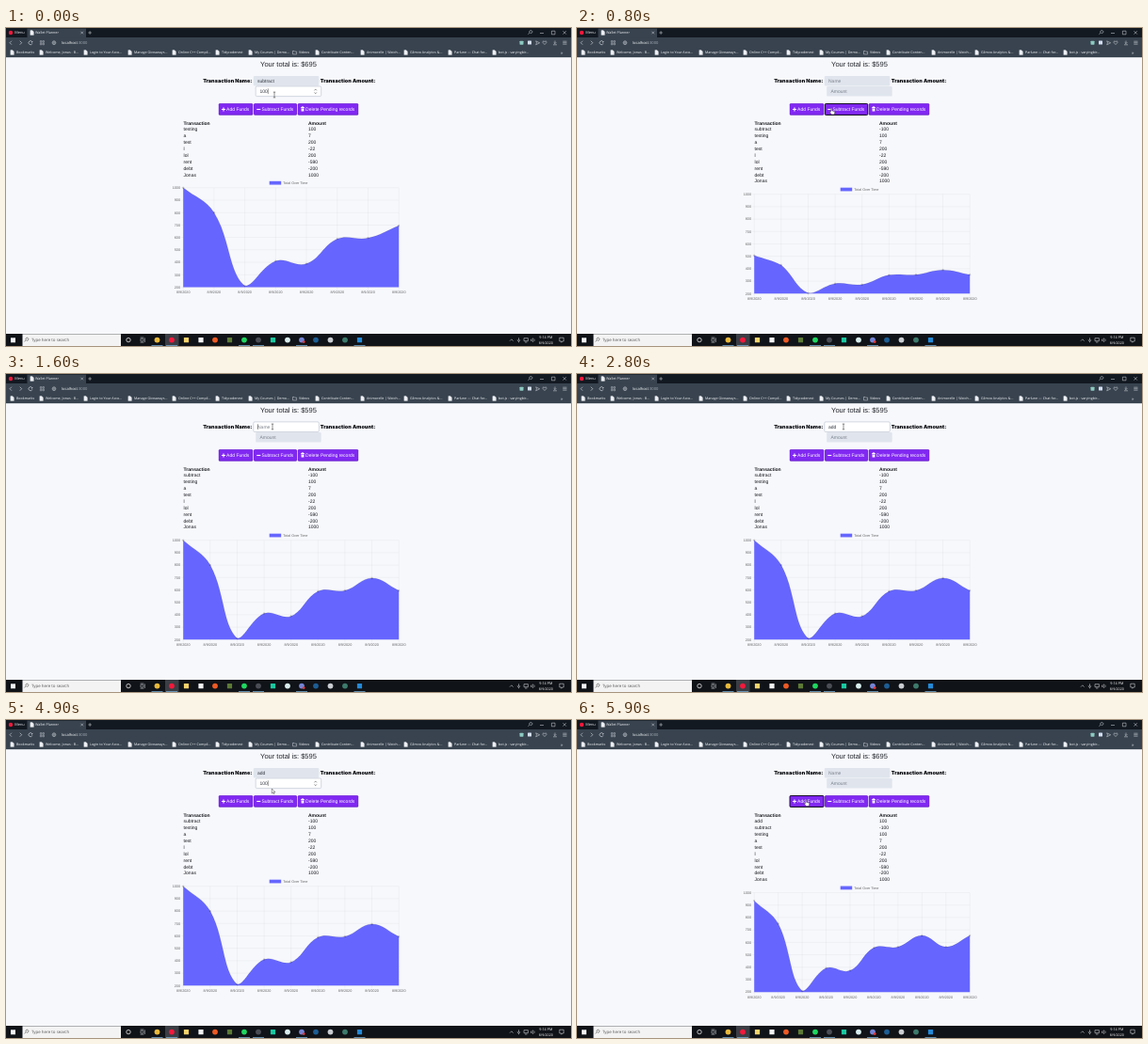
An HTML page that plays this animation: 600x338 px, repeating every 6000 ms.

```html
<!DOCTYPE html>
<html lang="en">
<head>
<meta charset="utf-8">
<title>Wallet Planner</title>
<style>
html, body { margin: 0; width: 100%; height: 100%; overflow: hidden; background: #f7f8fc; }
svg { display: block; width: 100vw; height: 100vh; font-family: "Liberation Sans", Arial, sans-serif; text-rendering: geometricPrecision; }
.ui { font-family: "Open Sans", "Noto Sans", sans-serif; }
.label { font-family: Inter, sans-serif; font-weight: 900; }
</style>
</head>
<body>
<svg viewBox="0 0 600 338"><g id="page"></g><g id="frame" class="ui"></g><g id="cursor"></g></svg>
<script>
const $ = id => document.getElementById(id);
const rect = (x, y, w, h, fill, more = '') =>
  `<rect x="${x}" y="${y}" width="${w}" height="${h}" fill="${fill}" ${more}/>`;
const disc = (x, y, r, fill, more = '') => `<circle cx="${x}" cy="${y}" r="${r}" fill="${fill}" ${more}/>`;
const text = (x, y, s, size, fill, more = '') =>
  `<text x="${x}" y="${y}" font-size="${size}" fill="${fill}" ${more}>${s}</text>`;
const line = (d, stroke, w = 0.6, fill = 'none') =>
  `<path d="${d}" stroke="${stroke}" stroke-width="${w}" fill="${fill}"/>`;
const END = 'text-anchor="end"', MID = 'text-anchor="middle"';

// Browser window and taskbar

const bookmarks = [
  [5, 'Bookmarks'], [36, 'Welcome, Jonas - B...'], [83, 'Login to Your Acco...'],
  [130, 'Manage Giveaways...'], [177, 'Online C++ Compil...'], [223, 'Tidycodenest'],
  [258, 'My Courses | Demo...'], [305, 'Videos'], [329, 'Contribute Conten...'],
  [377, 'Animorelle | Watch...'], [423, 'Glimvo Analytics &amp;...'],
  [470, 'Parlune — Chat for...'], [517, 'bot.js - varyingbir...']
];

const fileIcon = (x, y) =>
  line(`M${x - 1.7} ${y - 2.4}h2.2l1.4 1.4v3.4h-3.6z`, '#eef0f4', 0.3, '#eef0f4');
const folderIcon = (x, y) => line(`M${x - 2} ${y - 1.6}h1.5l.6.7h2v2.8h-4.1z`, '#d5d9e0', 0.5);
const lens = (x, y, color) => line(`M${x - 2} ${y + 2}l1.7-1.7a1.5 1.5 0 1 1 .5.4`, color, 0.55);

function browser() {
  const pale = '#dde1e7';
  let s = rect(0, 0, 600, 10.2, '#131921') + rect(0, 10, 600, 21.2, '#38434f')
    + rect(22.5, 0.6, 62.5, 9.8, '#38434f');
  s += disc(5, 5, 2.2, '#f5193c') + text(9.2, 6.4, 'Menu', 3.9, '#e8e9ee');
  s += fileIcon(27.5, 5) + text(31, 6.4, 'Wallet Planner', 3.7, '#f0f1f5');
  s += line('M79.4 3.7l2.6 2.6m0-2.6l-2.6 2.6M87.3 5h3.6m-1.8-1.8v3.6', pale, 0.5);
  s += lens(556.5, 4.7, pale);
  s += line('M567 5.5h4M579.4 3.2h3.6v3.6h-3.6zM591.5 3.2l3.4 3.4m0-3.4l-3.4 3.4', pale, 0.5);
  s += line('M6 13.7l-2 2 2 2M14.7 13.7l2 2-2 2M27.8 14.8a2 2 0 1 0 .1 1.6m.1-2.5v1.2h-1.2', pale);
  s += line('M36.3 13.6h1.6v1.6h-1.6zm2.6 0h1.6v1.6h-1.6zm-2.6 2.6h1.6v1.6h-1.6zm2.6 0h1.6v1.6h-1.6z', pale, 0.4);
  s += disc(51, 15.7, 1.9, 'none', `stroke="${pale}" stroke-width=".45"`)
    + line('M49.1 15.7h3.8M51 13.8q-1.6 1.9 0 3.8q1.6-1.9 0-3.8', pale, 0.3);
  s += text(59, 17.1, 'localhost<tspan fill="#a9b1bb">:3000</tspan>', 4.05, '#fff');
  s += rect(545.5, 13.7, 4, 4, '#8cc9c0', 'rx=".6"') + rect(554, 13.5, 4, 4, '#d5e0f5', 'rx=".6"');
  s += line('M562.7 13.8l4 2-4 2 .8-2z', pale, 0.5);
  s += line('M572 17.6l-1.9-2q-.5-1.6.8-1.7.8 0 1.1.8.3-.8 1.1-.8 1.3.1.8 1.7z', pale, 0.5);
  s += line('M583 13.5v3m-1.3-1.2l1.3 1.3 1.3-1.3M581 17.8h4M591.3 14.2h4.2m-4.2 1.5h4.2m-4.2 1.5h4.2', pale, 0.5);
  bookmarks.forEach(([x, name]) => {
    s += (name == 'Videos' ? folderIcon : fileIcon)(x + 1.5, 26) + text(x + 6, 27.4, name, 3.65, '#f6f7f9');
  });
  return s + text(589, 27.5, '»', 5, pale);
}

const apps = [
  [160.5, '#e8b93b'], [176, '#f5193c'], [191.5, '#f7d36b', 1], [207, '#f3f3f3', 1], [222, '#ee5a24'],
  [237.5, '#5d7a35', 1], [253, '#1ed760'], [268, '#4b4d55'], [283.5, '#18c9a0', 1], [299, '#d8eeee'],
  [314, '#7484d6'], [329, '#1d5d93'], [344.5, '#c9cdd2'], [360, '#3d7a6c'], [375.5, '#2489d6', 1]
];

function taskbar() {
  const pale = '#dfe2e6';
  let s = rect(0, 325, 600, 13, '#101318') + rect(17.5, 325.3, 104.5, 12.7, '#f3f3f3')
    + rect(169, 325, 14.5, 13, '#3b3e44') + rect(5, 329.3, 5, 5, '#f2f4f6');
  s += lens(21.5, 331.4, '#333') + text(27, 333.3, 'Type here to search', 4.4, '#555');
  s += disc(130, 331.6, 2.2, 'none', 'stroke="#fff" stroke-width=".7"');
  s += line('M143 330.2h3v2.8h-3zM142.6 329h3.8M142.6 334.2h3.8M147.4 329.4v4.6', pale, 0.5);
  apps.forEach(([x, fill, square]) => {
    s += square ? rect(x - 2.6, 329, 5.2, 5.2, fill, 'rx=".5"') : disc(x, 331.6, 2.9, fill);
  });
  [160.5, 176, 253, 268, 314, 375.5].forEach(x => s += rect(x - 6, 337.2, 12, 0.8, '#76a9d0'));
  s += disc(316.2, 333.6, 1.4, '#e33b3b');
  s += line('M535 332.6l1.8-1.8 1.8 1.8M544.5 329.3v2.8m-1.3-.8q0 1.7 1.3 1.7t1.3-1.7m-1.3 1.7v1.2M550 329.7h4.4v3h-4.4zm1 4.3h2.4', pale, 0.55);
  s += line('M557.4 331h1l1.3-1.2v3.8l-1.3-1.2h-1zM560.8 330.4q1 1.3 0 2.6', pale, 0.45);
  s += text(573.3, 330.4, '9:14 PM', 3.75, '#fff', MID) + text(573.3, 336, '8/9/2020', 3.6, '#fff', MID);
  return s + line('M587.8 329.2h4.4v3.8h-1.4l-1 1.2v-1.2h-2z', pale, 0.55);
}

// Timeline

const at = (steps, t) => steps.filter(s => s[0] <= t).pop()[1];
const names = [[0, 'subtract'], [800, ''], [1900, 'a'], [2100, 'ad'], [2300, 'add'], [5500, '']];
const amounts = [[0, '100'], [800, ''], [3800, '1'], [4600, '10'], [4700, '100'], [5500, '']];
const focuses = [[0, 'amount'], [700, 'sub'], [1500, 'name'], [3500, 'amount'], [5400, 'add']];
const keyTimes = [0, 1500, 1900, 2100, 2300, 3500, 3800, 4600, 4700].map(k => [k, k]);
const moves = [
  [0, 285, 71], [100, 285, 71], [600, 270, 85], [800, 270, 85], [1100, 282, 61.8], [1400, 283, 56],
  [2800, 283, 56], [3400, 283, 67], [4800, 283, 67], [4900, 282.3, 73], [5400, 243, 84.5], [6000, 243, 84.5]
];

function pointer(t) {
  const i = moves.findIndex(m => m[0] > t), a = moves[i - 1], b = moves[i];
  const u = (t - a[0]) / (b[0] - a[0]);
  return [a[1] + (b[1] - a[1]) * u, a[2] + (b[2] - a[2]) * u];
}

function drawCursor(x, y) {
  if (y > 80) return line(`M${x - .6} ${y + .6}q.7-1 1.3 0v2.3l2.6.7q.6.2.5.9l-.5 2.4h-3l-2-2.6q-.1-1 .9-.5l.4.4z`, '#111', 0.4, '#fff');
  if (y < 72.5) return line(`M${x - 1.2} ${y - 2.9}h2.4M${x} ${y - 2.9}v5.8M${x - 1.2} ${y + 2.9}h2.4`, '#222', 0.5);
  return line(`M${x} ${y}v5l1.2-1.1.8 1.8.8-.4-.8-1.7h1.6z`, '#111', 0.4, '#fff');
}

// Page

const records = [['add', 100], ['subtract', -100], ['testing', 100], ['a', 7], ['test', 200],
  ['l', -22], ['lol', 200], ['rent', -590], ['debt', -200], ['Jonas', 1000]];
const ROW = 6.875;

function field(x, y, value, hint, t, focused, spinner) {
  let s = rect(x, y, 69.5, 10.6, focused ? '#fff' : '#e0e5ed',
    `rx="1.2" ${focused ? 'stroke="#a9b3c2" stroke-width=".5"' : ''}`);
  s += text(x + 4.2, y + 6.7, value || hint, 5, value ? '#30343c' : '#7b818b');
  const blink = Math.floor((t - at(keyTimes, t)) / 500) % 2;
  if (focused && !blink) s += rect(x + 4.4 + value.length * 2.78, y + 2.3, 0.4, 5.8, '#111');
  if (spinner) s += line(`M${x + 62.3} ${y + 4.4}l1.2-1.4 1.2 1.4M${x + 62.3} ${y + 6.4}l1.2 1.4 1.2-1.4`, '#555', 0.6);
  return s;
}

function button(x, w, label, icon, focused, pressed) {
  const ring = focused ? 'stroke="#0b0614" stroke-width=".9"' : 'stroke="#6a1fd0" stroke-width=".4"';
  return `<g transform="translate(${x} ${pressed ? 81.4 : 80.5})">`
    + rect(0, 0, w, 12, '#651bc9', 'rx="1.1"') + rect(0, 0, w, 11.2, '#8128f2', 'rx="1.1"')
    + rect(0, 0, w, 12, 'none', 'rx="1.1" ' + ring)
    + line(icon, '#fff', 1.1) + text(8.1, 7.7, label, 5, '#fff') + '</g>';
}

const plus = 'M3 6h4M5 4v4', minus = 'M3 6h4';
const trash = 'M3 4.3h4M4 3.6h2M3.6 5.7h2.8M3.6 6.6h2.8M3.6 7.5h2.8';

const left = 188.2, right = 417.2, top_ = 169.8, bottom = 275.4;
const mix = (a, b, u) => a + (b - a) * u;

// Handles of the smooth curve, growing out of a flat line on the base
function handles(pts, grow) {
  const cap = v => Math.min(bottom, Math.max(top_, v));
  const flat = 0.4 * (pts[1][0] - pts[0][0]);
  return pts.map((p, i) => {
    const a = pts[i - 1] || p, b = pts[i + 1] || p;
    const d1 = Math.hypot(p[0] - a[0], p[1] - a[1]), d2 = Math.hypot(b[0] - p[0], b[1] - p[1]);
    const f = 0.4 / (d1 + d2), dx = b[0] - a[0], dy = b[1] - a[1];
    const place = (d, side) => mix(p[0] + side * flat, p[0] + side * f * d * dx, grow) + ' '
      + mix(bottom, cap(p[1] + side * f * d * dy), grow);
    return [place(d1, -1), place(d2, 1)];
  });
}

function chart(rows, grow) {
  const step = (right - left) / (rows.length - 1);
  const toY = v => bottom - (v - 200) / 800 * (bottom - top_);
  let sum = 0, grid = '', labels = '';
  const pts = [...rows].reverse().map(([, v], i) => [left + i * step, toY(sum += v)]);
  for (let v = 200; v <= 1000; v += 100) {
    grid += `M185.5 ${toY(v)}H${right}`;
    labels += text(185, toY(v) + 1.3, v, 3.75, '#666', END);
  }
  const c = handles(pts, grow);
  let curve = '', dots = '';
  pts.forEach(([x, y], i) => {
    const now = mix(bottom, y, grow);
    grid += `M${x} ${top_}V278.5`;
    labels += text(x, 282, '8/9/2020', 3.75, '#666', MID);
    curve += i ? `C${c[i - 1][1]} ${c[i][0]} ${x} ${now}` : `M${x} ${now}`;
    dots += disc(x, now, 0.94, '#0002', 'stroke="#0004" stroke-width=".3"');
  });
  return rect(279.7, 162.8, 12.5, 3.75, '#6666ff') + text(294.2, 166, 'Total Over Time', 3.75, '#666')
    + line(grid, '#0000001c', 0.35) + labels
    + line(curve + `V${bottom}H${left}z`, 'none', 0, '#6666ff') + line(curve, '#0000001a', 0.94) + dots;
}

function page(t, y) {
  const added = t < 800 ? 0 : t < 5500 ? 1 : 2;
  const rows = records.slice(2 - added);
  const total = rows.reduce((sum, r) => sum + r[1], 0);
  const focus = at(focuses, t);
  const age = Math.min(1, (t - [-1000, 686, 5434][added]) / 1000);
  let s = rect(0, 31, 600, 294, '#f7f8fc') + text(300, 41, `Your total is: $${total}`, 7.5, '#22252b', MID);
  s += text(261.3, 57.7, 'Transaction Name:', 5.47, '#0c0d10', END + ' class="label"');
  s += text(333.8, 57.7, 'Transaction Amount:', 5.47, '#0c0d10', 'class="label"');
  s += field(262.8, 50.9, at(names, t), 'Name', t, focus == 'name');
  s += field(265.2, 62, at(amounts, t), 'Amount', t, focus == 'amount', focus == 'amount' || y > 61.5 && y < 72.5);
  s += button(226, 36, 'Add Funds', plus, focus == 'add', t == 5400);
  s += button(263.3, 45.5, 'Subtract Funds', minus, focus == 'sub', t == 700);
  s += button(310, 64, 'Delete Pending records', trash);
  [['Transaction', 'Amount'], ...rows].forEach((row, i) => row.forEach((v, j) =>
    s += text(j ? 321 : 188.6, 102.6 + i * ROW, v, 5, '#16181c', i ? '' : 'font-weight="700"')));
  return s + `<g transform="translate(0 ${added * ROW})">${chart(rows, 1 - (1 - age) ** 4)}</g>`;
}

$('frame').innerHTML = browser() + taskbar();
let last = -1;
function tick() {
  const t = Math.floor(performance.now() % 6000 / 100) * 100;
  if (t != last) {
    const [x, y] = pointer(t);
    $('page').innerHTML = page(t, y);
    $('cursor').innerHTML = drawCursor(x, y);
    last = t;
  }
  requestAnimationFrame(tick);
}
tick();
</script>
</body>
</html>
```
